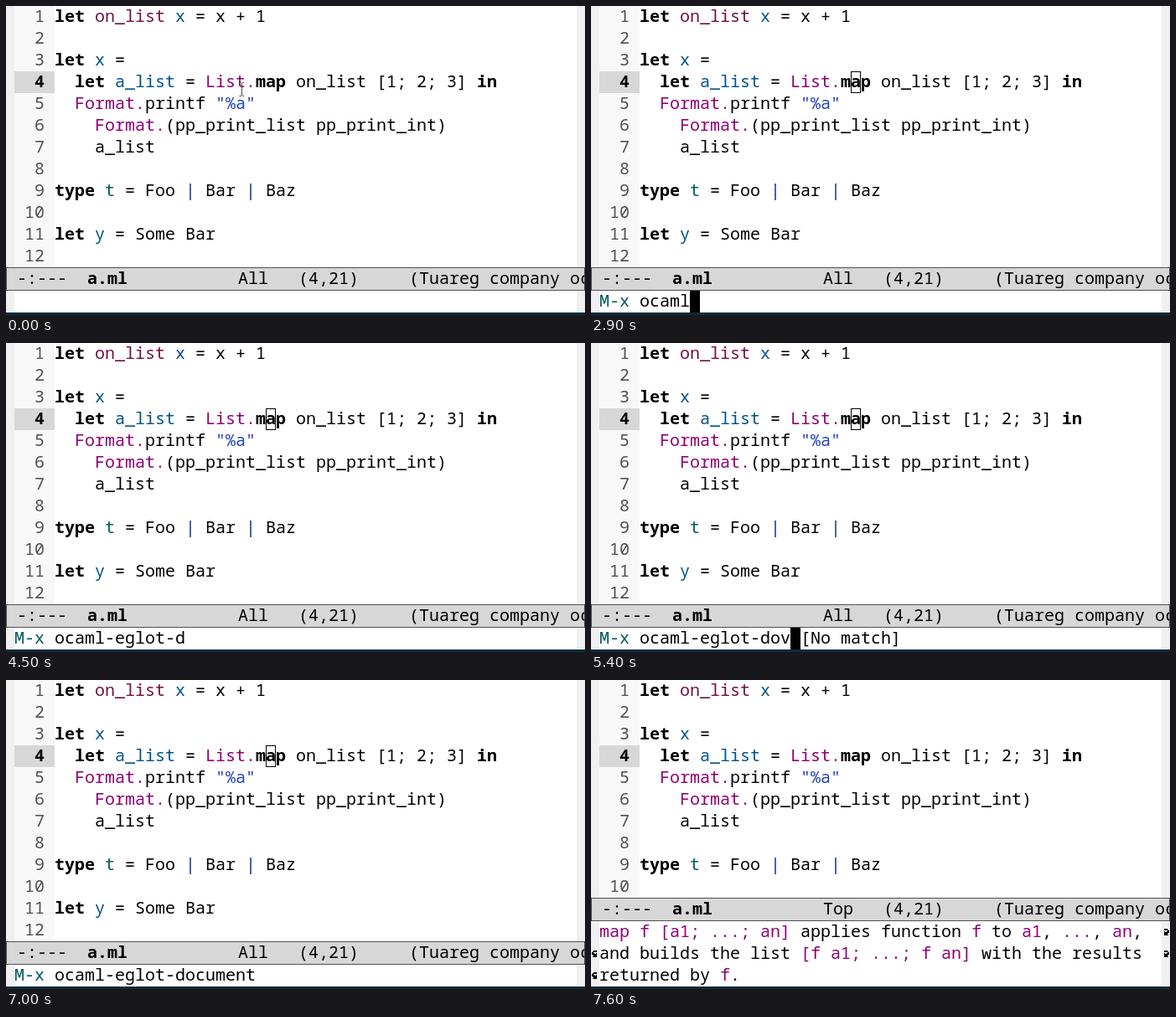
An HTML page for the animation above (8 s loop, 691x369 px).

```html
<!DOCTYPE html>
<html lang="en">
<head>
<meta charset="utf-8">
<title>Editor session</title>
<style>
  html, body { margin: 0; width: 100%; height: 100%; overflow: hidden; background: #fff; }
  svg { display: block; width: 691px; height: 369px; }
  text {
    font: 20px "Noto Sans Mono", "DejaVu Sans Mono", monospace;
    font-variant-ligatures: none;
    white-space: pre;
    fill: #000;
  }
  .k { font-weight: 700; }
  .f { fill: #721045; }
  .v { fill: #00538b; }
  .m { fill: #8f0075; }
  .s { fill: #2544bb; }
  .t { fill: #005a5f; }
  .o { fill: #002f88; }
  .n { fill: #505050; }
  .w { fill: #fff; font-weight: 700; }
</style>
</head>
<body>
<svg id="stage" viewBox="0 0 691 369"></svg>
<script>
const CELL = 12, ROW = 26, LOOP = 8000;
const stage = document.getElementById('stage');

// «kword» sets "word" in the style class k
const code = [
  '«klet» «fon_list» «vx» = x + 1',
  '',
  '«klet» «vx» =',
  '  «klet» «va_list» = «mList.»«kmap» on_list [1; 2; 3] «kin»',
  '  «mFormat.»printf «s"%a"»',
  '    «mFormat.»(pp_print_list pp_print_int)',
  '    a_list',
  '',
  '«ktype» «tt» = Foo «o|» Bar «o|» Baz',
  '',
  '«klet» «vy» = Some Bar',
  ''
];
const doc = [
  '«mmap f [a1; ...; an]» applies function «mf» to «ma1», «m...», «man»,',
  'and builds the list «m[f a1; ...; f an]» with the results',
  'returned by «mf».'
];

// time, minibuffer input (null when closed), cursor lit, message
const steps = [
  [0, null, 0], [400, null, 1],
  [800, '', 1], [1300, '', 0],
  [1800, 'oc', 1], [2000, 'oca', 1], [2100, 'ocal', 1],
  [2500, 'oca', 1], [2800, 'ocam', 1], [2900, 'ocaml', 1],
  [3100, 'ocaml-', 1], [3200, 'ocaml-e', 1], [3400, 'ocaml-egl', 1],
  [3600, 'ocaml-eglo', 1], [3700, 'ocaml-eglot', 1],
  [3900, 'ocaml-eglot-', 1], [4000, 'ocaml-eglot-d', 1], [4500, 'ocaml-eglot-d', 0],
  [4800, 'ocaml-eglot-do', 1], [5000, 'ocaml-eglot-dov', 1],
  [5400, 'ocaml-eglot-dov', 1, ' [No match]'],
  [5500, 'ocaml-eglot-do', 1], [5900, 'ocaml-eglot-dovc', 1],
  [6300, 'ocaml-eglot-do', 1], [6400, 'ocaml-eglot-doc', 1],
  [6500, 'ocaml-eglot-document', 1], [7000, 'ocaml-eglot-document', 0],
  [7100, null, 1], [7600, null, 0]
];
const MOUSE_END = 1800, DOC_START = 7100;

const rect = (x, y, w, h, fill, more = '') =>
  `<rect x="${x}" y="${y}" width="${w}" height="${h}" fill="${fill}" ${more}/>`;

const text = (x, top, str) => `<text x="${x}" y="${top + 19}">` +
  str.replace(/«(.)(.*?)»/g, '<tspan class="$1">$2</tspan>') + '</text>';

const block = (x, y) => rect(x, y, CELL, ROW, '#000');

function buffer(rows) {
  let out = rect(0, 0, 691, 369, '#fff') + rect(0, 0, 10, 366, '#f0f0f0') +
    rect(681, 0, 10, 366, '#f0f0f0') + rect(10, 0, 48, rows * ROW, '#f8f8f8') +
    rect(10, 78, 48, ROW, '#d7d7d7') + rect(0, 366, 691, 3, '#0f2b3a');
  for (let i = 0; i < rows; i++) {
    const num = String(i + 1).padStart(3);
    out += text(10, i * ROW, `«${i === 3 ? 'k' : 'n'}${num}»`) + text(58, i * ROW, code[i]);
  }
  return out;
}

const modeLine = (y, where) => rect(0, y, 691, 28, '#d7d7d7') +
  text(13, y + 1, `-:---  «ka.ml»           ${where}   (4,21)     (Tuareg company oc`) +
  rect(.5, y + .5, 690, 27, 'none', 'stroke="#505050"');

// Wrapped-line marker in the fringe; dir is -1 for the left side
const curl = (x, y, dir) => `<path transform="translate(${x} ${y}) scale(${dir} 1)"
  d="M-2 0H2V1H3V2H4V5H3V6H2V7H3V8H-2V3H-1V4H1V3H2V2H-2Z"/>`;

const mouse = '<g fill="none"><path id="beam" d="M278.5 91.5H280.5L281.5 92.5L282.5 91.5H284' +
  'M281.5 92V107M278.5 107.5H280.5L281.5 106.5L282.5 107.5H284" stroke="#444"/></g>';

function help() {
  return buffer(10) + modeLine(260, 'Top') +
    doc.map((line, i) => text(10, 288 + i * ROW, line)).join('') +
    curl(686, 297, 1) + curl(686, 323, 1) + curl(5, 323, -1) + curl(5, 349, -1);
}

function draw([time, input, lit, message = '']) {
  let out = time < DOC_START ? buffer(12) + modeLine(312, 'All') : help();
  if (input !== null) {
    out += rect(310.5, 78.5, 11, 25, 'none', 'stroke="#000"') +
      text(10, 340, `«tM-x» ${input}${message}`);
    if (lit) out += block(58 + input.length * CELL, 340);
  } else if (lit) {
    out += block(310, 78) + text(310, 78, '«wa»');
  }
  if (time < MOUSE_END) out += mouse;
  stage.innerHTML = out;
}

let shown;
function tick() {
  const t = performance.now() % LOOP;
  const step = steps.findLast(s => s[0] <= t);
  if (step !== shown) draw(shown = step);
  requestAnimationFrame(tick);
}
tick();
</script>
</body>
</html>
```
